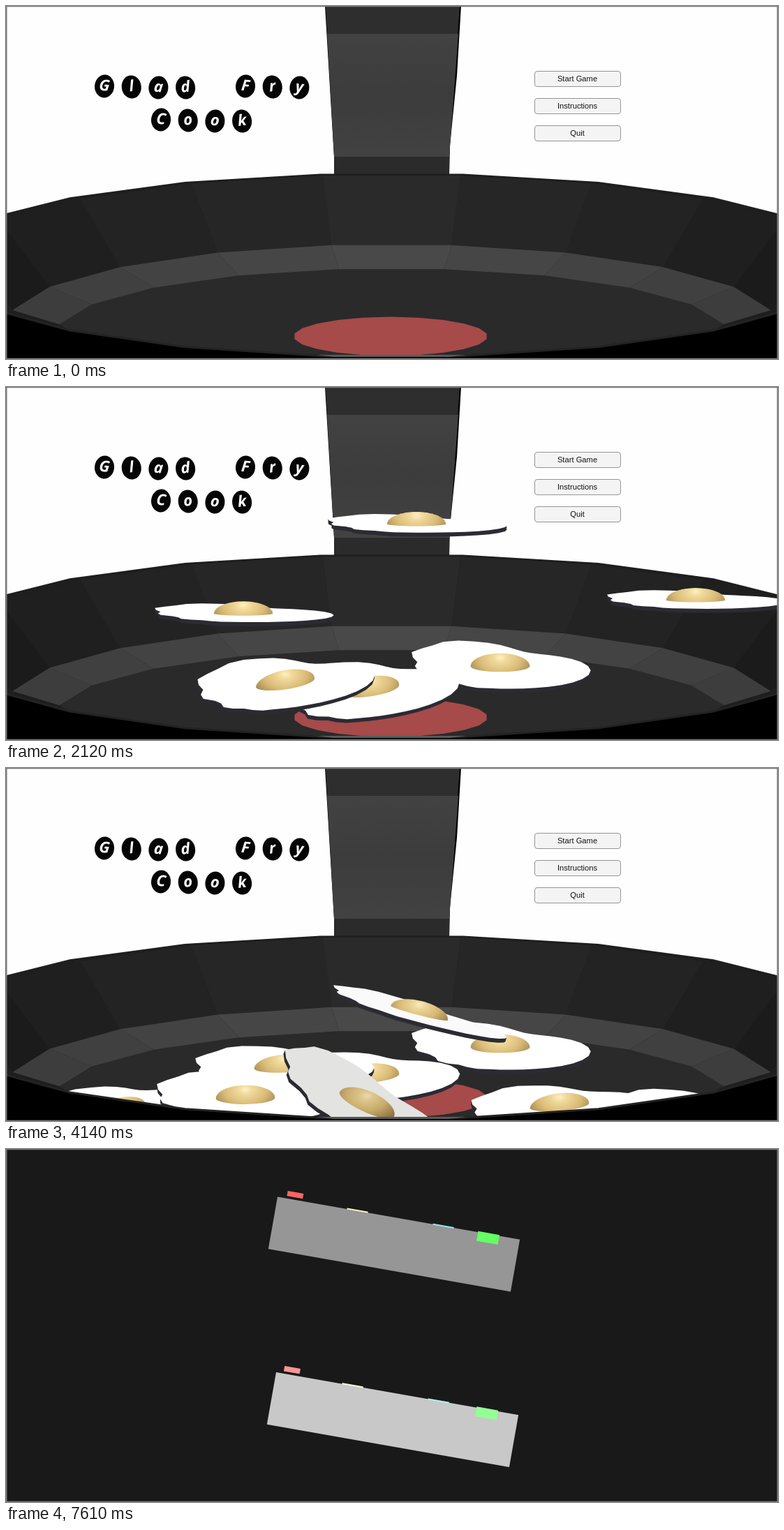
Write an HTML page with a canvas that moves like this. It is 1106x506 px and loops after 7.71 s.

```html
<!DOCTYPE html>
<html lang="en">
<head>
<meta charset="utf-8">
<title>Glad Fry Cook</title>
<style>
html, body { margin: 0; width: 100%; height: 100%; overflow: hidden; background: #fff; }
canvas { display: block; width: 1106px; height: 506px; }
</style>
</head>
<body>
<canvas id="stage" width="1106" height="506"></canvas>
<script>
const ctx = document.getElementById('stage').getContext('2d');
const W = 1106, H = 506, LOOP = 7710, MENU_END = 7230;
const { sin, cos, sqrt, max, min, abs, PI } = Math;
const RAD = PI / 180;
const lerp = (a, b, k) => a + (b - a) * k;
const clamp = k => max(0, min(1, k));
const ease = k => k * k * (3 - 2 * k);
const gray = g => `rgb(${g},${g},${g})`;
const range = (n, fn) => Array.from({ length: n }, (_, i) => fn(i));

function trace(pts) {
  ctx.beginPath();
  pts.forEach(([x, y]) => ctx.lineTo(x, y));
  ctx.closePath();
}
function poly(color, pts) {
  trace(pts);
  ctx.fillStyle = color;
  ctx.fill();
}

// --- Pan: rings of a 20-sided shape, left to right; a negative height gives the near half ---
const ring = (r, y, h) => range(10, i => {
  const a = (i - 4.5) * 18 * RAD;
  return [552.5 + r * sin(a), y - h * cos(a)];
});
const rim = ring(652, 359, 120), lip = ring(631, 361.5, 120);
const base = ring(550, 453.4, 112), floor = ring(482, 471, 95);
const front = ring(652, 373, -130);

function band(outer, inner, tone, fade) {
  for (let i = 0; i < 9; i++) {
    poly(gray(tone - fade * abs(i - 4)), [outer[i], outer[i + 1], inner[i + 1], inner[i]]);
  }
}

function drawPan() {
  poly('#000', [[457, 0], [652, 0], [646, 100], [636, 200], [635, 245], [470, 245], [470, 216], [463, 100]]);
  poly('#2e2e2e', [[458, 0], [650, 0], [647, 40], [460, 40]]);
  const steel = ctx.createLinearGradient(0, 40, 0, 216);
  steel.addColorStop(0, '#424242');
  steel.addColorStop(.5, '#3c3c3c');
  steel.addColorStop(1, '#424242');
  poly(steel, [[460, 40], [648, 40], [635, 216], [470, 216]]);
  poly('#2b2b2b', [[470, 216], [635, 216], [635, 246], [470, 246]]);

  ctx.fillStyle = '#000';
  ctx.fillRect(0, 437, W, H);
  const near = front.slice().reverse();
  poly('#1e1e1e', [...rim, ...near]);
  band(lip, base, 42, 3.7);
  poly('#2a2a2a', [...floor, ...near.slice(2, 8)]);
  band(base, floor, 73, 3);
  poly('#a64a4a', range(22, i => {
    const a = (i + .5) * PI / 11;
    return [551 + 139 * cos(a), 473.5 + 28 * sin(a)];
  }));
}

function drawRim() {
  trace([...front, [W + 90, H + 90], [-90, H + 90]]);
  ctx.strokeStyle = '#232323';
  ctx.lineWidth = 3;
  ctx.stroke();
  poly('#5a5a5a', [[445, 500], [660, 500], [635, 503], [470, 503]]);
}

// --- Eggs ---
// Outline of the white: a lopsided blob with a frayed left side.
const plan = range(40, i => {
  const a = i * 9 * RAD;
  const r = 112 - 6 * cos(a) + 3.5 * sin(a) + 11 * cos(2 * a) + 20 * sin(2 * a) + 9 * cos(3 * a)
    + 6 * max(0, -cos(a)) * cos(11 * a - 111 * RAD);
  return [r * cos(a), r * sin(a)];
});
const TOP = -20, FLAT = .12, SPEED = .5, GRAVITY = .001;
const fallY = t => TOP + SPEED * t + GRAVITY * t * t / 2;
const fallTime = y => (sqrt(SPEED * SPEED + 2 * GRAVITY * (y - TOP)) - SPEED) / GRAVITY;

// An egg drops at a given time in one column, then eases through its poses.
// Pose: time, x, y, depth (0 edge-on, 1 facing the viewer), roll.
const eggs = [];
function egg(start, x, ...poses) {
  const y = poses[0][2] - 20;
  eggs.push({ start, x, poses: [[start + fallTime(y), x, y, FLAT, 0], ...poses] });
}
egg(515, 708, [1200, 708, 400, .31, 0]);
egg(880, 519, [1900, 521, 432, .38, -.15], [3000, 522, 443, .42, 0], [3900, 521, 442, .33, -.08]);
egg(1400, 400, [2100, 400, 424, .35, -.14], [3220, 404, 355, 1, 0], [3850, 398, 429, .28, -.04]);
egg(1672, 988, [2500, 988, 495, .3, 0]);
egg(3340, 793, [4120, 793, 484, .28, -.08], [5400, 797, 490, .28, -.03]);
egg(3290, 152, [4140, 158, 491, .35, -.18], [5400, 128, 495, .44, 0]);
egg(1652, 340, [2450, 340, 470, .33, 0], [3220, 346, 459, .77, 0], [3850, 343, 473, .33, -.01]);
egg(1795, 588, [2600, 595, 388, .3, .1], [3220, 621, 315, .9, .42], [4140, 517, 482, .46, .39], [5400, 517, 508, .33, .05]);
egg(3610, 591, [4140, 592, 351, .13, .25], [5200, 578, 376, .29, .09]);

function poseAt({ start, x, poses }, t) {
  if (t < poses[0][0]) return [t, x, fallY(t - start), FLAT, 0];
  const i = poses.findIndex(p => p[0] > t);
  if (i < 0) return poses[poses.length - 1];
  const p = poses[i - 1], q = poses[i], k = ease((t - p[0]) / (q[0] - p[0]));
  return p.map((v, j) => lerp(v, q[j], k));
}

function drawEgg([, x, y, depth, roll]) {
  const a = cos(roll), b = sin(roll);
  const nx = abs(b), ny = -sqrt(max(0, 1 - b * b - depth * depth));
  const shade = clamp(2.6 * depth * roll);
  const face = h => plan.map(([u, v]) => [x + a * u + nx * h, y + b * u + depth * v + ny * h]);
  for (let h = -6; h < 0; h += 1.5) poly('#2b2b33', face(h));
  const g = 255 - 60 * shade;
  poly(`rgb(${g},${g},${g - 5 * shade})`, face(0));

  // The yolk is a stack of shrinking discs filled as one shape.
  ctx.beginPath();
  for (let lift = 0; lift < 90; lift += 5) {
    const s = 17 * sin(lift * RAD), r = cos(lift * RAD);
    ctx.save();
    ctx.transform(a, b, 0, depth, x + nx * s, y + ny * s);
    ctx.moveTo(42.5 * r, 0);
    ctx.ellipse(0, 0, 42.5 * r, 27 * r, 0, 0, 2 * PI);
    ctx.restore();
  }
  ctx.save();
  ctx.translate(x, y - 12);
  ctx.scale(1, .7);
  const gold = ctx.createRadialGradient(0, 0, 0, 0, 0, 56);
  gold.addColorStop(0, '#fff0c2');
  gold.addColorStop(.17, '#f1da9c');
  gold.addColorStop(.55, '#d9bb77');
  gold.addColorStop(1, '#957947');
  ctx.fillStyle = gold;
  ctx.fill();
  ctx.fillStyle = `rgba(40,25,0,${.22 * shade})`;
  ctx.fill();
  ctx.restore();
}

// --- Title, buttons, cursor ---
function text(str, x, y, font, color) {
  ctx.font = font;
  ctx.fillStyle = color;
  ctx.textAlign = 'center';
  ctx.textBaseline = 'middle';
  ctx.fillText(str, x, y);
}

function badges(word, x, y) {
  [...word].forEach((ch, i) => {
    ctx.save();
    ctx.translate(x + i * 38.7, y + min(i, 2));
    ctx.rotate(i % 2 ? -.12 : .1);
    ctx.beginPath();
    ctx.ellipse(0, 0, 14, 16.5, 0, 0, 2 * PI);
    ctx.fillStyle = '#050505';
    ctx.fill();
    text(ch, 0, 0, 'italic bold 22px "Noto Sans", sans-serif', '#fff');
    ctx.restore();
  });
}

function button(label, y, tone) {
  ctx.beginPath();
  ctx.roundRect(757.5, y + .5, 123, 22, 3.5);
  ctx.fillStyle = gray(tone);
  ctx.fill();
  ctx.strokeStyle = '#959595';
  ctx.lineWidth = 1;
  ctx.stroke();
  text(label, 818.5, y + 12, '11.2px "Liberation Sans", Arial, sans-serif', '#111');
}

const arrow = [[0, 0], [0, 13], [3, 10.3], [5, 15], [7, 14], [5, 9.6], [9, 9.3]];
function drawCursor(t) {
  if (t < 5930 || t > 7600) return;
  const come = 1 - (1 - clamp((t - 5915) / 545)) ** 3;
  const go = clamp((t - 7440) / 130);
  const x = lerp(lerp(875, 842, come), 608, go), y = lerp(lerp(5, 102, come), 8, go);
  ctx.save();
  ctx.translate(x + .5, y + .5);
  poly('#fff', arrow);
  ctx.strokeStyle = '#222';
  ctx.lineWidth = 1;
  ctx.stroke();
  ctx.restore();
}

// --- Scenes ---
function drawMenu(t) {
  ctx.fillStyle = '#fefefe';
  ctx.fillRect(0, 0, W, H);
  drawPan();
  ctx.save();
  trace([[-90, 0], ...front, [W + 90, 0]]);
  ctx.clip();
  eggs.filter(e => t >= e.start).forEach(e => drawEgg(poseAt(e, t)));
  ctx.restore();
  drawRim();
  badges('Glad', 141, 115);
  badges('Fry', 343, 115);
  badges('Cook', 222, 163);
  const tone = t < 6440 ? 244 : lerp(235, 192, clamp((t - 6850) / 120));
  ['Start Game', 'Instructions', 'Quit'].forEach((label, i) => button(label, 93 + 39 * i, i ? 244 : tone));
}

function counter(x, y, color, pale, shift) {
  const slab = (u, v, w, h, fill) => {
    ctx.fillStyle = fill;
    ctx.fillRect(u, v, w, h);
  };
  const tag = (u, v, w, h, fill) => {
    slab(u, v, w, h, fill);
    slab(u, v, w, h, `rgba(255,255,255,${pale})`);
  };
  ctx.save();
  ctx.translate(x, y);
  ctx.rotate(10 * RAD);
  slab(0, 0, 352.5, 76, color);
  tag(13 - shift / 2, -11, 23, 7.5, '#ff6464');
  tag(101 - shift, -1.5, 30.5, 2, '#f6f3c6');
  tag(226 - shift, -1, 30.5, 2, '#8fe9ea');
  tag(291.7, -1.3, 31, 14, '#64ff64');
  ctx.restore();
}

function drawKitchen() {
  ctx.fillStyle = '#191919';
  ctx.fillRect(0, 0, W, H);
  counter(389, 68.5, '#969696', 0, 0);
  counter(387, 320, '#c8c8c8', .31, 5);
}

function frame(t) {
  if (t < MENU_END) drawMenu(t);
  else drawKitchen();
  drawCursor(t);
  ctx.strokeStyle = '#777';
  ctx.lineWidth = 1.5;
  ctx.strokeRect(.75, .5, W - 1.5, H - 1);
}

const begin = performance.now();
(function tick() {
  frame((performance.now() - begin) % LOOP);
  requestAnimationFrame(tick);
})();
</script>
</body>
</html>
```
